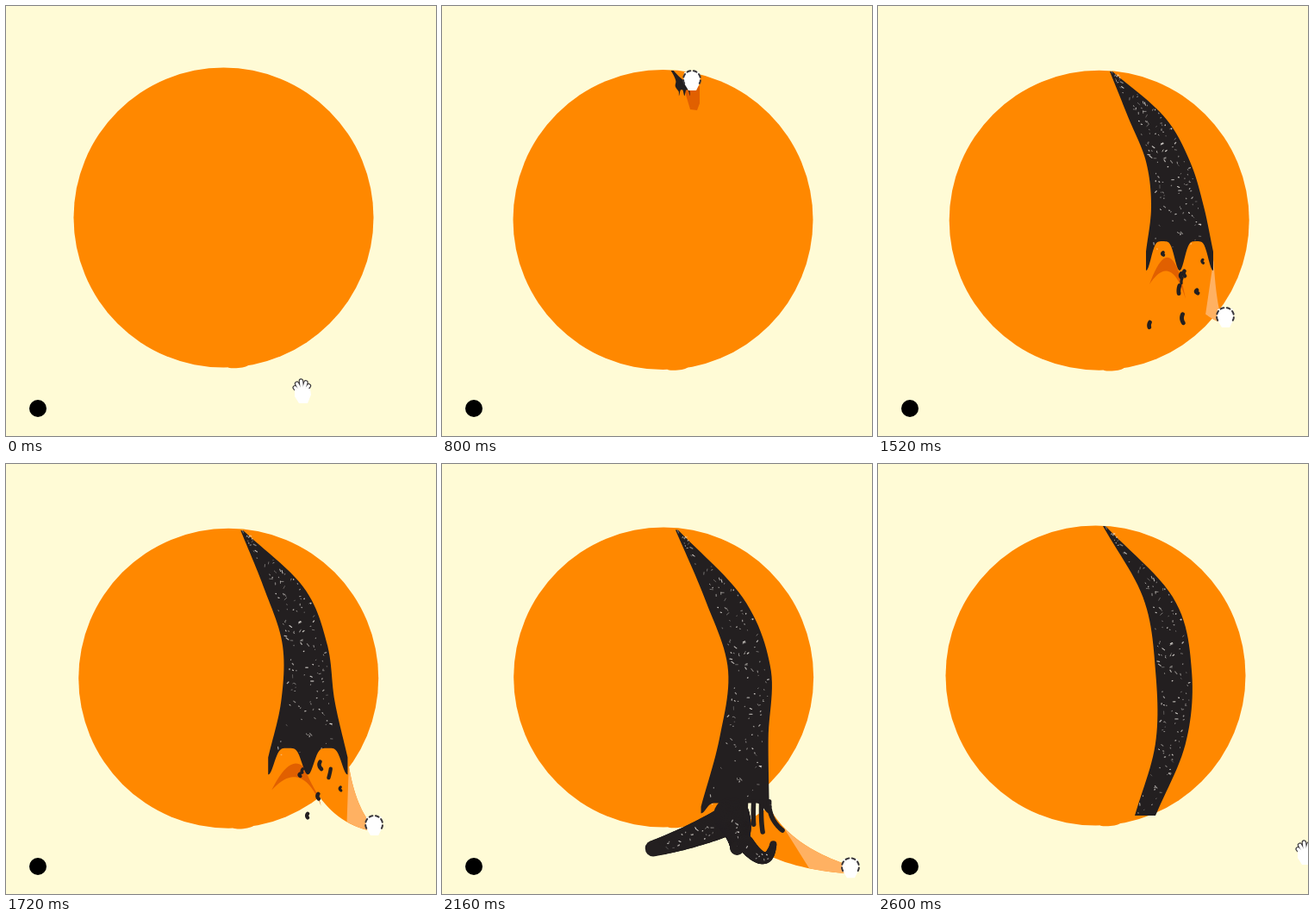
Recreate the animation shown at these times as an HTML page with a canvas. Size 499 by 499 pixels, loop 2.64 s.

```html
<!DOCTYPE html>
<html lang="en">
<head>
<meta charset="utf-8">
<title>Peeling ink</title>
<style>
  html, body { margin: 0; width: 100%; height: 100%; overflow: hidden; background: #fffbd6; }
  canvas { display: block; }
</style>
</head>
<body>
<canvas id="stage" width="499" height="499"></canvas>
<script>
const ctx = document.getElementById('stage').getContext('2d');
const LOOP = 2640, STEP = 40;
const CREAM = '#fffbd6', ORANGE = '#ff8800', DARK = '#e16000', LIGHT = '#ffb162', INK = '#231f20';

const mix = (a, b, k) => a + (b - a) * k;
const clamp01 = v => Math.max(0, Math.min(1, v));
const ramp = (from, to, t) => clamp01((t - from) / (to - from));
const mixPoint = (p, q, k) => [mix(p[0], q[0], k), mix(p[1], q[1], k)];
const bezier = (a, b, c, u) => mixPoint(mixPoint(a, b, u), mixPoint(b, c, u), u);
const range = (n, f) => Array.from({ length: n }, (_, i) => f(i / (n - 1), i));

function seeded(seed) {
  return () => (seed = (seed * 16807) % 2147483647) / 2147483647;
}

// Smooth cubic track through rows of [position, ...values].
function track(keys, t) {
  let i = 0;
  while (i < keys.length - 2 && keys[i + 1][0] <= t) i++;
  const a = keys[i], b = keys[i + 1], span = b[0] - a[0], u = clamp01((t - a[0]) / span);
  const slope = (j, k) => {
    const p = keys[j - 1] || keys[j], q = keys[j + 1] || keys[j];
    return (q[k] - p[k]) / (q[0] - p[0]);
  };
  return a.slice(1).map((_, n) => {
    const k = n + 1;
    return a[k] * (1 + 2 * u) * (1 - u) ** 2 + b[k] * u * u * (3 - 2 * u) +
      span * (slope(i, k) * u * (1 - u) ** 2 + slope(i + 1, k) * u * u * (u - 1));
  });
}

function fillShape(pts, color) {
  ctx.beginPath();
  pts.forEach(p => ctx.lineTo(...p));
  ctx.closePath();
  ctx.fillStyle = color;
  ctx.fill();
}

function stroke(pts, width, color = INK) {
  ctx.beginPath();
  pts.forEach(p => ctx.lineTo(...p));
  ctx.lineWidth = width;
  ctx.strokeStyle = color;
  ctx.stroke();
}

function disc([x, y], r, color) {
  ctx.fillStyle = color;
  ctx.beginPath();
  ctx.arc(x, y, r, 0, 7);
  ctx.fill();
}

const sunKeys = [
  [0, 252.5, 245.5], [640, 252.5, 245.5], [800, 256.5, 248], [1160, 251.5, 248.5],
  [1520, 256.7, 248.7], [1960, 258.7, 248.3], [2360, 254.8, 246.5], [2560, 252.5, 245.5]
];
const handKeys = [
  [0, 344, 447], [560, 313, 224], [700, 286, 80], [800, 290, 85], [1160, 380, 226],
  [1520, 403, 360], [1960, 457, 466], [2360, 487, 455], [2600, 496, 451]
];
// time, tip x, top, bottom, drip depth, then left and right edge at each quarter of the height
const inkKeys = [
  [720, 268, 75, 76, 0, 268, 268, 268, 268, 268, 268, 268, 268],
  [1160, 262, 75, 204, 36, 275, 303, 287, 337, 285, 357, 304, 371],
  [1520, 270, 76, 285, 34, 290, 332, 311, 362, 317, 378, 311, 389],
  [1960, 275, 78, 395, 24, 307, 355, 329, 381, 318, 381, 296, 397],
  [2360, 267, 74, 390, 0, 302, 342, 331, 377, 326, 373, 306, 354],
  [2560, 262, 72, 408, 0, 308, 343, 322, 364, 322, 357, 298, 322]
];

function inkAt(t) {
  const [tip, top, bottom, drip, ...edges] = track(inkKeys, t);
  const levels = range(5, (v, i) => i ? [v, edges[2 * i - 2], edges[2 * i - 1]] : [0, tip - 1, tip + 2]);
  return {
    top, bottom, drip, left: edges[6], right: edges[7],
    sides: v => track(levels, v),
    edgeY: u => bottom + drip * (Math.abs(Math.cos(2 * Math.PI * u)) ** 5 - 0.35)
  };
}

const random = seeded(4711);
const specks = range(150, () => ({
  u: random(), v: 0.08 + 0.84 * random(), turn: random() * 3.2,
  size: 0.3 + 1.6 * random() ** 2, width: 0.6 + 0.8 * random(), alpha: 0.35 + 0.5 * random()
}));

function drawSpeck({ turn, size, width, alpha }, x, y) {
  const dx = Math.cos(turn) * size, dy = Math.sin(turn) * size;
  ctx.globalAlpha = alpha;
  stroke([[x - dx, y - dy], [x + dx, y + dy]], width, '#f4f0ea');
  ctx.globalAlpha = 1;
}

function drawInk(ink) {
  const rows = range(50, v => [mix(ink.top, ink.bottom, v), ...ink.sides(v)]);
  fillShape([
    ...rows.map(([y, , r]) => [r, y]),
    ...range(60, u => [mix(ink.right, ink.left, u), ink.edgeY(1 - u)]),
    ...rows.reverse().map(([y, l]) => [l, y])
  ], INK);
  if (ink.bottom - ink.top < 40) return;
  for (const s of specks) {
    const [l, r] = ink.sides(s.u);
    drawSpeck(s, mix(l, r, s.v), mix(ink.top, ink.bottom, s.u) - 3);
  }
}

// Tapered limb with a few specks along it.
function limb(root, bend, end, r0, r1, speckled) {
  range(40, u => disc(bezier(root, bend, end, u), mix(r0, r1, u), INK));
  specks.slice(0, speckled).forEach(s => {
    const [x, y] = bezier(root, bend, end, s.u);
    drawSpeck(s, x, y + (s.v - 0.5) * mix(r0, r1, s.u) * 1.5);
  });
}

function drawFeet(t, spread) {
  const grow = ramp(1720, 1900, t) * (1 - ramp(2400, 2500, t));
  if (!grow) return;
  const reach = (root, bend, end, r0, r1, count) =>
    limb(root, mixPoint(root, bend, grow), mixPoint(root, end, grow), r0 * grow, r1 * grow, count);
  reach([mix(344, 326, spread), mix(418, 407, spread)], [290, 434], mixPoint([264, 434], [228, 457], spread),
    mix(14, 21, spread), mix(13, 6, spread), 24);
  if (!spread) return;
  const ankle = [336, 408];
  reach(ankle, mixPoint(ankle, [358, 450], spread), mixPoint(ankle, [348, 480], spread), 21, 8, 10);
  reach([352, 440], [378, 474], mixPoint(ankle, [428, 471], spread), 19 * spread, 4, 8);
}

function drawStrand(t, ink, hand, spread) {
  if (t < 1000 || t > 2480) return;
  const root = [ink.right, ink.bottom];
  const low = [mix(ink.right, ink.left, mix(0.6, 0.4, spread)), ink.bottom - 5 + 60 * spread];
  const [hx, hy] = mixPoint(hand, root, ramp(2400, 2480, t));
  const side = (from, end, sag) => {
    const bend = [mix(from[0], end[0], 0.25), mix(from[1], end[1], sag)];
    return (u0, u1) => range(24, k => bezier(from, bend, end, mix(u0, u1, k)));
  };
  const upper = side(root, [hx - 6, hy - 3], 0.65), lower = side(low, [hx - 3, hy + 8], 0.85);
  fillShape([...upper(0, 1), ...lower(1, 0)], ORANGE);
  fillShape([...upper(0.1 + 0.35 * spread, 1), ...lower(1, 0.75)], LIGHT);
}

function drawShadow(t, ink, [hx, hy]) {
  if (t > 720 && t < 1280) {
    fillShape([[hx - 10, hy + 8], [hx + 9, hy + 8], [hx + 9, hy + 28], [hx + 6, hy + 36], [hx - 2, hy + 35]], DARK);
  }
  if (t < 1040 || t > 2000) return;
  const from = [ink.left + 4, ink.bottom + 38], to = mixPoint([ink.left, ink.bottom + 35], [hx, hy], 0.5);
  const x = mix(from[0], to[0], 0.6);
  const arch = y => range(24, u => bezier(from, [x, y], to, u));
  fillShape([...arch(ink.bottom - 32), ...arch(ink.bottom).reverse()], DARK);
}

// Runs of ink pulled from the lower edge towards the hand.
function drawRuns(t, ink, hand) {
  const grow = Math.min(ramp(1760, 1920, t), 1 - ramp(2040, 2240, t));
  if (!grow) return;
  range(4, (k, i) => {
    const root = [ink.right - 9 * (3 - i), ink.bottom - 6];
    const end = mixPoint([root[0] + 6, root[1] + 30 + 15 * i], [hand[0] + 8, hand[1] - 19], k ** 6);
    const bend = [root[0] - 2, mix(root[1], end[1], 0.9)];
    stroke(range(20, u => bezier(root, bend, end, u * grow)), 5.5);
  });
}

const drops = range(22, (_, i) => ({
  born: 960 + 46 * i, place: random(), vx: 0.3 * random() - 0.15,
  vy: 0.3 + 0.25 * random(), length: 4 + 10 * random() ** 2, width: 3 + 2 * random()
}));

function drawDrops(t) {
  for (const d of drops) {
    const age = t - d.born;
    if (age < 0 || age > 380) continue;
    const ink = inkAt(d.born);
    const x = mix(ink.left, ink.right, d.place) + d.vx * age, y = ink.bottom + d.vy * age;
    if (y > 482) continue;
    const dx = d.vx * d.length * 2, dy = d.vy * d.length * 2;
    stroke(range(8, u => bezier([x, y], [x - dx / 2 - 2, y + dy / 2], [x + dx, y + dy], u)), d.width);
  }
}

function drawHand([x, y], open) {
  ctx.save();
  ctx.translate(x, y);
  const outline = '#39363a';
  if (open) {
    const finger = (i, inset) => {
      const angle = -2.7 + 0.5 * i, reach = 12 - 1.2 * Math.abs(i - 2);
      return [[Math.cos(angle) * inset, Math.sin(angle) * inset + 2], [Math.cos(angle) * reach, Math.sin(angle) * reach]];
    };
    range(5, (_, i) => stroke(finger(i, 6), 5.6, outline));
    range(5, (_, i) => stroke(finger(i, 4), 3.4, '#fff'));
    fillShape([[-9, -2], [9, -3], [10, 4], [6, 14], [-4, 14], [-9, 6]], '#fff');
  } else {
    fillShape([[-9, -8], [-3, -10], [8, -9], [10, -4], [9, 5], [5, 13], [-4, 13], [-10, 3]], '#fff');
    ctx.setLineDash([4, 3.5]);
    stroke(range(20, u => [
      -10 * Math.cos(mix(-0.5, Math.PI + 0.5, u)), -10 * Math.sin(mix(-0.5, Math.PI + 0.5, u))
    ]), 2, outline);
  }
  ctx.restore();
}

function drawSun([x, y]) {
  disc([x, y], 174, ORANGE);
  ctx.beginPath();
  ctx.ellipse(x + 17, y + 172, 12, 2.6, -0.1, 0, 7);
  ctx.fill();
}

function draw(t) {
  ctx.lineCap = ctx.lineJoin = 'round';
  ctx.fillStyle = CREAM;
  ctx.fillRect(0, 0, 499, 499);
  disc([37, 467], 10, '#000');
  drawSun(track(sunKeys, t));

  const hand = track(handKeys, t), spread = ramp(1960, 2340, t);
  if (t > 720) {
    const ink = inkAt(t);
    drawShadow(t, ink, hand);
    drawStrand(t, ink, hand, spread);
    drawInk(ink);
    drawFeet(t, spread);
    drawRuns(t, ink, hand);
    drawDrops(t);
  }
  drawHand(hand, t < 680 || t > 2420);
}

function frame(now) {
  draw(Math.floor(now % LOOP / STEP) * STEP);
  requestAnimationFrame(frame);
}
draw(0);
requestAnimationFrame(frame);
</script>
</body>
</html>
```
